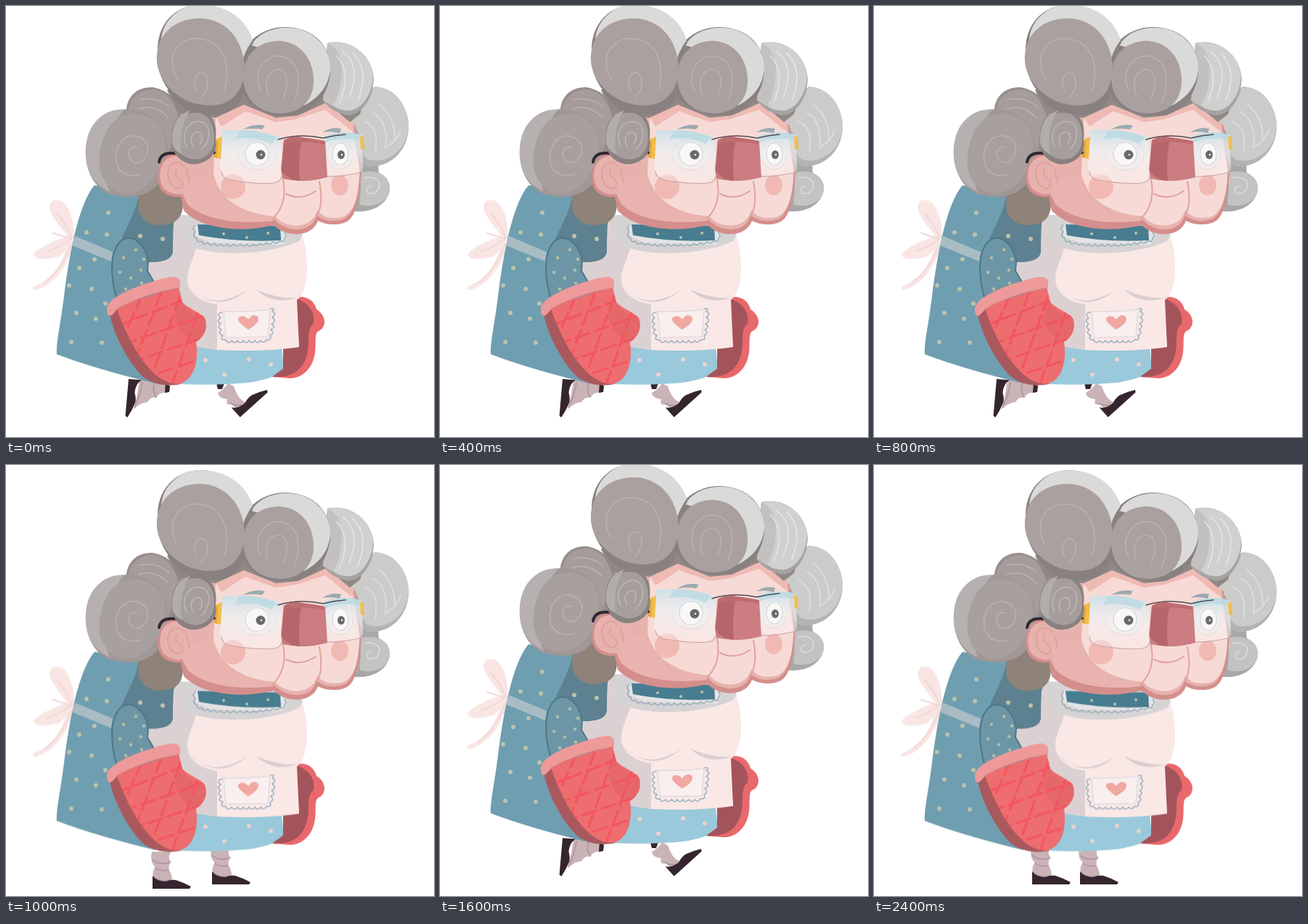
Recreate the animation shown at these times as an HTML page. Size 590 by 594 pixels, loop 4.4 s.

```html
<!DOCTYPE html>
<html lang="en">
<head>
<meta charset="utf-8">
<title>Walking granny</title>
<style>
html, body { margin: 0; width: 100%; height: 100%; overflow: hidden; background: #fff; }
svg { display: block; width: 590px; height: 594px; }
.line { fill: none; stroke-linecap: round; stroke-linejoin: round; }
.head, .body, .legs { animation: 4.4s step-end infinite; }
.head { --drop: 9px; animation-name: bob; }
.body { --drop: 10.5px; animation-name: bob; }
.legs { opacity: 0; }
.stride { animation-name: stride; }
.pass { animation-name: pass; }
.plant { animation-name: plant; }
.brake { animation-name: brake; }
.stand { animation-name: stand; }

/* one step lasts 200 ms, 1/22 of the loop */
@keyframes bob {
  0%, 9.09%, 18.181%, 27.272%, 36.363%, 45.454% { transform: none; }
  4.545%, 13.636%, 22.727%, 31.818%, 40.909%, 50%, 100% { transform: translateY(var(--drop)); }
}
@keyframes stride {
  0%, 9.09%, 18.181%, 27.272%, 36.363% { opacity: 1; }
  4.545%, 13.636%, 22.727%, 31.818%, 40.909%, 100% { opacity: 0; }
}
@keyframes pass {
  4.545%, 13.636%, 22.727%, 50% { opacity: 1; }
  0%, 9.09%, 18.181%, 27.272%, 54.545%, 100% { opacity: 0; }
}
@keyframes plant {
  31.818%, 40.909% { opacity: 1; }
  0%, 36.363%, 45.454%, 100% { opacity: 0; }
}
@keyframes brake { 45.454% { opacity: 1; } 0%, 50%, 100% { opacity: 0; } }
@keyframes stand { 0% { opacity: 0; } 54.545%, 100% { opacity: 1; } }
</style>
</head>
<body>
<svg viewBox="0 0 590 594">
  <defs>
    <linearGradient id="lens" x1="0" y1="0" x2="0" y2="1">
      <stop offset="0" stop-color="#c9e1e9" stop-opacity=".9"/>
      <stop offset=".4" stop-color="#edf2f4" stop-opacity=".7"/>
      <stop offset="1" stop-color="#fff" stop-opacity=".3"/>
    </linearGradient>
    <path id="shoe" fill="#35252e" d="M0-17Q6-9 18-9Q26-12 32-11Q42-8 53-2L51 1L0 1Z"/>
    <g id="foot">
      <path fill="#c9b3b7" d="M-1-50H25Q20-40 26-36Q20-30 24-23Q28-15 27-8H13L1-14Q-1-23 4-29Q-4-35-1-50Z"/>
      <path class="line" stroke="#a99399" stroke-width="1.5" d="M0-39Q10-31 23-35M4-28Q12-22 21-25M2-15Q12-7 24-11"/>
      <use href="#shoe"/>
    </g>
    <clipPath id="mitt"><path d="M152 415L238 387L243 408C251 417 266 421 274 430C279 443 274 455 262 463C266 491 259 517 237 521C204 521 173 475 152 415Z"/></clipPath>
  </defs>

  <!-- legs -->
  <g class="legs stride">
    <path fill="#c9b3b7" d="M184 515L226 518L222 533Q212 531 207 540Q200 538 195 546Q186 546 176 556L181 535Z"/>
    <path class="line" stroke="#a99399" stroke-width="1.5" d="M205 520Q201 530 207 539M188 519Q186 535 177 553"/>
    <path fill="#35252e" d="M220 518L226 524L225 532L219 533Z"/>
    <use href="#shoe" transform="translate(170 514) rotate(95)"/>
    <path fill="#c9b3b7" d="M292 533Q300 529 306 520L314 524Q321 545 332 546Q345 541 357 530L325 561L311 549Q302 551 305 542Q293 541 292 533Z"/>
    <path class="line" stroke="#a99399" stroke-width="1.5" d="M310 548Q326 556 345 540"/>
    <path fill="#35252e" d="M290 520H301L298 528L292 528Z"/>
    <use href="#shoe" transform="translate(322 566) rotate(-42)"/>
  </g>
  <g class="legs pass">
    <use href="#foot" x="202" y="583"/>
    <use href="#foot" x="284" y="577"/>
  </g>
  <g class="legs plant">
    <use href="#foot" x="218" y="579"/>
    <use href="#foot" x="277" y="577"/>
  </g>
  <g class="legs brake">
    <path fill="#c9b3b7" d="M191 519L230 519L224 535Q214 534 211 550Q204 552 201 570L193 545Z"/>
    <path class="line" stroke="#a99399" stroke-width="1.5" d="M196 530Q201 545 200 562"/>
    <use href="#shoe" transform="translate(179 532) rotate(65)"/>
    <path fill="#c9b3b7" d="M288 533L301 526Q300 535 309 538Q305 545 319 552L346 553L306 565Q300 564 296 551L288 549Q291 543 285 540Z"/>
    <path class="line" stroke="#a99399" stroke-width="1.5" d="M296 552Q304 562 338 555"/>
    <path fill="#35252e" d="M288 520H297L298 527L290 531Z"/>
    <use href="#shoe" transform="translate(305 576) rotate(-25)"/>
  </g>
  <g class="legs stand">
    <use href="#foot" x="218" y="577"/>
    <use href="#foot" x="284" y="577"/>
  </g>

  <g class="body">
    <!-- bow -->
    <g fill="#f9e6e4">
      <path d="M94 320C94 298 89 275 75 268C64 265 58 272 61 282C66 296 77 305 87 322Z"/>
      <path d="M91 316C72 320 44 333 38 342C38 351 59 350 74 345L92 328Z"/>
      <path d="M86 326C78 352 67 377 37 387L39 392C65 386 84 361 93 329Z"/>
    </g>
    <path class="line" stroke="#f0d8d6" stroke-width="2" d="M70 286Q84 301 91 320Q74 333 57 338M89 329Q80 360 53 381M65 313L90 321"/>

    <!-- dress -->
    <path fill="#6f9eb0" d="M122 247C101 272 88 335 80 400C75 440 69 464 70 480C105 493 150 507 205 520L290 500L262 300L190 258Z"/>
    <path fill="#5d8190" d="M183 262C176 290 168 300 158 324C177 310 194 333 196 357L232 351V298Z"/>
    <path fill="#a9bcc4" d="M95 317L147 339L145 352L91 330Z"/>
    <path fill="#99c9da" d="M200 518C245 523 304 523 342 518C365 513 378 508 383 500L380 470L250 468Z"/>
    <g class="line" stroke="#bec2ab" stroke-width="6">
      <path d="M141 285h0M139 315h0M111 312h0M101 361h0M122 349h0M87 385h0M118 390h0M97 423h0M124 431h0M90 463h0M132 464h0M137 410h0M185 317h0M216 321h0"/>
      <path stroke="#e9d3cf" d="M275 488h0M301 508h0M335 487h0M365 494h0"/>
    </g>

    <!-- far mitten -->
    <path fill="#e9686c" d="M398 402C414 398 425 406 428 418C440 425 443 440 433 447C424 449 428 462 426 478C422 504 404 514 390 513L367 511L382 500V474L404 470Z"/>
    <path fill="#a3545b" d="M399 403C416 408 427 421 424 438C413 446 420 462 415 480C410 501 395 513 367 511L382 500V472L404 469Z"/>

    <!-- apron -->
    <path fill="#fae8e6" d="M238 288L231 300L230 340C228 351 212 354 196 353V368L205 382L240 402L258 469L292 474C330 476 370 475 404 470L401 405C417 393 418 355 411 325L400 296Z"/>
    <path fill="#dcd1d2" d="M238 288L231 300L230 340C228 351 212 354 196 353V368L205 382L240 402L258 469L291 474V411C266 408 250 394 250 376C251 355 263 345 263 322V292Z"/>
    <path fill="#d6d3d5" d="M240 288C235 310 240 325 253 331C289 346 364 343 404 324L409 316L399 290Z"/>
    <path fill="#dacdce" d="M253 388Q292 426 333 391Q312 405 291 406Q266 404 253 388ZM345 391Q368 413 402 402Q375 404 345 391Z"/>
    <path fill="#e4e4e5" d="M261 301L385 303L387 320L381 329L282 326L261 317Z"/>
    <path fill="#487c90" d="M264 301L378 303L379 323Q319 326 266 316Z"/>
    <path class="line" stroke="#97acb8" stroke-width="1.5" d="M261 302q-6 5 0 9q-5 7 2 9q0 7 7 4q2 7 8 2q4 6 9 1q4 6 9 1q4 6 9 0q4 6 9 0q4 6 9 0q4 6 9 0q4 6 9 0q4 5 9-1q4 5 9-1q4 5 9-1q5 4 9-1q7 2 7-4q4-3 0-8"/>
    <path class="line" stroke="#bec2ab" stroke-width="4" d="M300 314h0M332 319h0M361 313h0"/>

    <!-- pocket -->
    <path fill="#f8efee" stroke="#e2dbdc" stroke-width="1.5" d="M300 421Q334 422 364 418L361 456L303 457Z"/>
    <path class="line" stroke="#9eb3c0" stroke-width="1.6" d="M298 422q-9 2-2 8q-7 4 0 8q-6 5 1 8q-6 5 2 8q-5 7 4 6q3 7 8 1q4 6 8 0q4 6 8 0q4 6 8 0q4 6 8 0q4 6 8 0q4 5 8-1q8 1 5-6q7-3 1-8q8-4 1-8q8-4 1-9q7-5 0-8q5-4-2-4"/>
    <path fill="#f1a7a2" d="M334 446C324 439 317 433 321 429Q328 425 334 432Q340 423 347 428C351 435 342 441 334 446Z"/>

    <!-- near arm and mitten -->
    <path fill="#6c96a6" stroke="#4d7787" stroke-width="2" d="M158 324C142 340 144 374 153 405L205 382L195 365L196 352C194 334 177 310 158 324Z"/>
    <path class="line" stroke="#b3bca9" stroke-width="4.5" d="M162 347h0M179 336h0M190 349h0M157 367h0M172 375h0M186 364h0M165 390h0M187 382h0"/>
    <path fill="#a9595d" d="M141 412C145 452 171 494 190 512C208 524 226 524 241 521L236 395L156 410Z"/>
    <g clip-path="url(#mitt)">
      <path fill="#ee6d6f" d="M130 370H290V530H130Z"/>
      <path fill="#d2595e" d="M238 402Q252 427 275 429V462H258Q240 455 232 430Z" opacity=".3"/>
      <path class="line" stroke="#f25660" stroke-width="3.2" stroke-dasharray="20 8" d="M150 442L245 405M160 467L275 426M170 492L275 456M185 514L265 488M188 398L160 460M214 394L174 500M240 400L198 518M264 424L228 524"/>
    </g>
    <path fill="#ee9a9a" d="M139 419C137 405 169 389 205 379C222 373 239 370 240 380V388C210 392 175 405 154 417C147 426 140 433 139 419Z"/>
    <path class="line" stroke="#d87b7d" stroke-width="1.5" d="M153 418Q191 397 238 389"/>
  </g>

  <g class="head">
    <!-- back hair -->
    <path fill="#8e8279" d="M190 234C176 250 185 266 182 279C187 299 206 305 219 301C238 300 247 286 243 262L229 230Z"/>
    <path fill="#978e8d" d="M166 153C163 126 180 111 202 112C222 115 238 130 242 150L240 230L192 225Z"/>
    <path fill="#a59c9b" d="M169 151C166 129 184 114 204 115C224 118 237 138 238 162L220 210L190 190Z"/>
    <path fill="#a09796" d="M112 184C120 145 161 135 191 147C222 160 230 198 216 235C202 264 172 267 142 259C115 247 105 212 112 184Z"/>
    <path fill="#b6b1b0" d="M110 195C113 157 141 140 163 143C144 164 126 211 143 256C117 244 108 220 110 195Z"/>
    <path fill="#a8a09f" d="M141 168C158 142 195 143 212 166C231 195 211 243 181 255C157 266 135 249 129 224C127 205 131 184 141 168Z"/>
    <path class="line" stroke="#bbb3b1" stroke-width="1.5" d="M181 195C171 191 165 204 173 213C184 223 199 207 195 192C187 174 162 174 154 195C145 223 163 239 185 232M183 142Q205 134 224 154M184 129Q207 124 225 139"/>

    <!-- far hair -->
    <path fill="#a9a8a8" d="M470 140L510 150L514 235L474 282Z"/>
    <path fill="#b4b3b3" d="M503 113C535 107 556 139 555 169C553 202 528 223 499 221L485 213L489 178L469 152Z"/>
    <path fill="#cbcbca" d="M507 111C537 110 557 144 555 167C552 198 529 215 506 213C484 212 494 184 487 177L474 154C492 145 502 132 507 111Z"/>
    <path class="line" stroke="#dededd" stroke-width="1.7" d="M514 135Q537 153 536 186M506 147Q528 160 523 196M494 159Q515 167 509 201M525 194Q541 184 544 171"/>
    <path fill="#a8a7a7" d="M480 228C508 221 531 234 529 253C526 276 500 287 474 282L483 257Z"/>
    <path fill="#c3c3c2" d="M484 231C509 222 531 234 529 253C527 270 508 279 488 274C486 263 494 247 484 231Z"/>
    <path class="line" stroke="#dadad9" stroke-width="1.7" d="M494 237C516 232 521 251 507 258C497 261 493 251 504 248"/>

    <!-- face -->
    <path fill="#d48e8c" d="M241 202L282 145L442 128L482 165L490 228C487 268 482 290 470 297C456 304 440 301 430 296C423 318 388 321 369 302C326 313 269 308 245 282L241 263C228 264 216 260 211 248C205 222 217 201 241 202Z"/>
    <path fill="#e7b2ad" d="M239 207L285 150L335 135H445L480 165L488 228C486 265 479 286 467 293C449 300 435 294 428 288C423 314 385 313 370 294C330 303 276 297 250 273L243 259C231 261 218 256 214 245C208 222 219 205 239 207Z"/>
    <path fill="#f7dad5" d="M289 153L345 140H445L477 168L487 225C487 265 479 283 466 290C447 295 435 290 429 281C423 308 386 308 371 290C333 287 296 272 286 232Z"/>
    <path fill="#e9b4af" d="M284 235C291 269 323 288 371 290L368 296C321 301 272 295 250 273L243 239Z"/>
    <path fill="#efbab4" d="M287 150L330 132L400 146L443 130L480 162L476 172L440 143L400 156L372 160L330 145L297 166Z"/>
    <circle cx="313" cy="249" r="17" fill="#f1b9b4"/>
    <ellipse cx="460" cy="247" rx="12" ry="14" fill="#f1b9b4"/>
    <path class="line" stroke="#dfa29e" stroke-width="2" d="M382 239C387 265 379 282 368 293M432 242C437 268 434 281 428 290M386 259Q407 269 427 255M226 243C216 221 235 207 245 221M236 224C228 241 247 235 243 247C239 256 229 249 226 243M249 225L253 243"/>

    <!-- eyes, glasses and nose -->
    <g fill="#f0e1df" stroke="#e5cfcd" stroke-width="2">
      <ellipse cx="346" cy="205" rx="26" ry="21"/>
      <ellipse cx="460" cy="205" rx="18" ry="20"/>
    </g>
    <g fill="url(#lens)">
      <path d="M298 172Q337 168 378 180L383 229Q383 244 369 244Q335 244 308 239Q296 235 295 222Z"/>
      <path d="M436 180Q464 169 491 178L492 224Q490 231 482 232L442 235Z"/>
    </g>
    <g fill="#faf8f7" stroke="#d5d9db" stroke-width="1.2">
      <circle cx="346" cy="204" r="16"/>
      <ellipse cx="461" cy="204" rx="11" ry="15"/>
    </g>
    <g fill="#6c6a69">
      <circle cx="351" cy="205" r="6.5"/>
      <ellipse cx="462" cy="205" rx="5" ry="6"/>
    </g>
    <path class="line" stroke="#fff" stroke-width="2.5" d="M352 205h0M463 205h0"/>
    <path class="line" stroke="#c9a6a8" stroke-width="1.2" d="M297 228Q298 238 310 240Q345 246 369 244Q380 243 381 231M443 235Q468 235 490 229"/>
    <path fill="#b9d8e2" opacity=".75" d="M322 172Q347 169 374 181L366 190Q340 178 316 184ZM439 180Q461 171 488 177L487 185Q463 179 441 188Z"/>
    <path fill="#9aaab0" d="M327 170Q342 161 357 165L353 170Q342 168 327 170ZM436 174Q448 166 462 169L460 175Q448 172 436 174Z"/>
    <path class="line" stroke="#554a51" stroke-width="1.6" d="M375 184Q405 175 437 182Q453 178 468 177"/>
    <path fill="#cb7d81" d="M383 185Q398 177 413 182L440 186L443 236Q412 245 381 238L379 224Z"/>
    <path fill="#b5666b" d="M383 185Q396 178 408 182Q402 210 405 241Q391 241 380 228Z"/>
    <path fill="#bd6c70" d="M383 185Q399 177 439 186L440 191Q409 184 383 190Z"/>
    <path fill="#f2bd4b" d="M288 184L298 180L296 211L286 208Z"/>
    <path fill="#e2a83c" d="M288 187L292 185L291 210L286 208Z"/>
    <path fill="#f2bd4b" d="M488 179L493 181L494 199L489 197Z"/>
    <path class="line" stroke="#332831" stroke-width="4" d="M211 215C213 202 225 202 237 203M277 201L287 202"/>

    <!-- front hair -->
    <path fill="#908887" d="M222 116L238 148L289 154L328 136L372 154L402 151L442 133L474 160L488 149L500 110L440 60L300 60Z"/>
    <path fill="#a5a3a2" d="M443 51C474 44 505 66 507 101C504 135 484 154 468 150Q447 145 437 130Z"/>
    <path fill="#d0d0cf" d="M443 51C474 45 505 66 506 99C503 130 484 147 468 144Q455 143 446 133Q457 99 443 51Z"/>
    <path fill="#c2c1c0" d="M443 51Q462 60 463 85Q463 120 450 138L437 130Z"/>
    <path class="line" stroke="#e3e3e2" stroke-width="1.8" d="M464 63Q491 82 473 126M478 65Q502 88 485 130M456 69Q477 92 460 133"/>

    <path fill="#898180" d="M320 100C316 62 344 30 383 29C427 29 449 58 447 90C446 116 430 143 402 150C365 156 326 143 320 100Z"/>
    <path fill="#dadad9" d="M338 54C349 36 370 29 390 30C426 31 449 61 447 87C445 110 432 126 411 137L405 75Z"/>
    <path fill="#a9a09f" d="M327 99C327 67 347 48 377 48C407 50 424 74 424 103C424 129 408 146 381 148C349 149 328 129 327 99Z"/>
    <path class="line" stroke="#bab2b0" stroke-width="1.5" d="M351 117C339 93 356 66 379 69C405 75 408 104 397 132M362 124C353 102 365 84 379 88C391 93 388 114 382 127"/>

    <path fill="#898180" d="M209 63C208 25 233-2 270-2C309 0 334 25 341 51C328 66 316 87 326 120C321 142 304 151 282 150C252 147 236 139 225 117C211 98 207 80 209 63Z"/>
    <path fill="#dadad9" d="M214 49C214 21 240-3 269-2C309-1 333 22 340 47Q328 63 325 81L255 35Z"/>
    <path fill="#a9a09f" d="M208 77C206 40 231 17 268 17C308 18 330 53 329 90C326 121 308 138 279 137C241 136 211 107 208 77Z"/>
    <path class="line" stroke="#bab2b0" stroke-width="1.5" d="M236 101C218 70 238 42 267 45C301 49 310 83 301 116M263 118C253 98 270 83 277 98C280 109 276 119 269 126"/>

    <path fill="#898180" d="M229 176C230 153 246 142 266 143C289 148 291 169 289 184C293 205 276 219 255 218C235 214 225 196 229 176Z"/>
    <path fill="#a69e9d" d="M234 174C238 151 254 144 269 148C286 155 289 174 286 191C281 210 264 215 250 209C233 202 229 187 234 174Z"/>
    <path fill="#b2acab" d="M229 180Q231 150 254 144Q238 166 242 204Q227 198 229 180Z"/>
    <path class="line" stroke="#bfb8b6" stroke-width="1.5" d="M249 194C239 170 257 154 273 161C284 169 280 190 269 198M258 193C250 179 262 169 269 176Q272 184 267 190"/>
  </g>
</svg>
</body>
</html>
```
